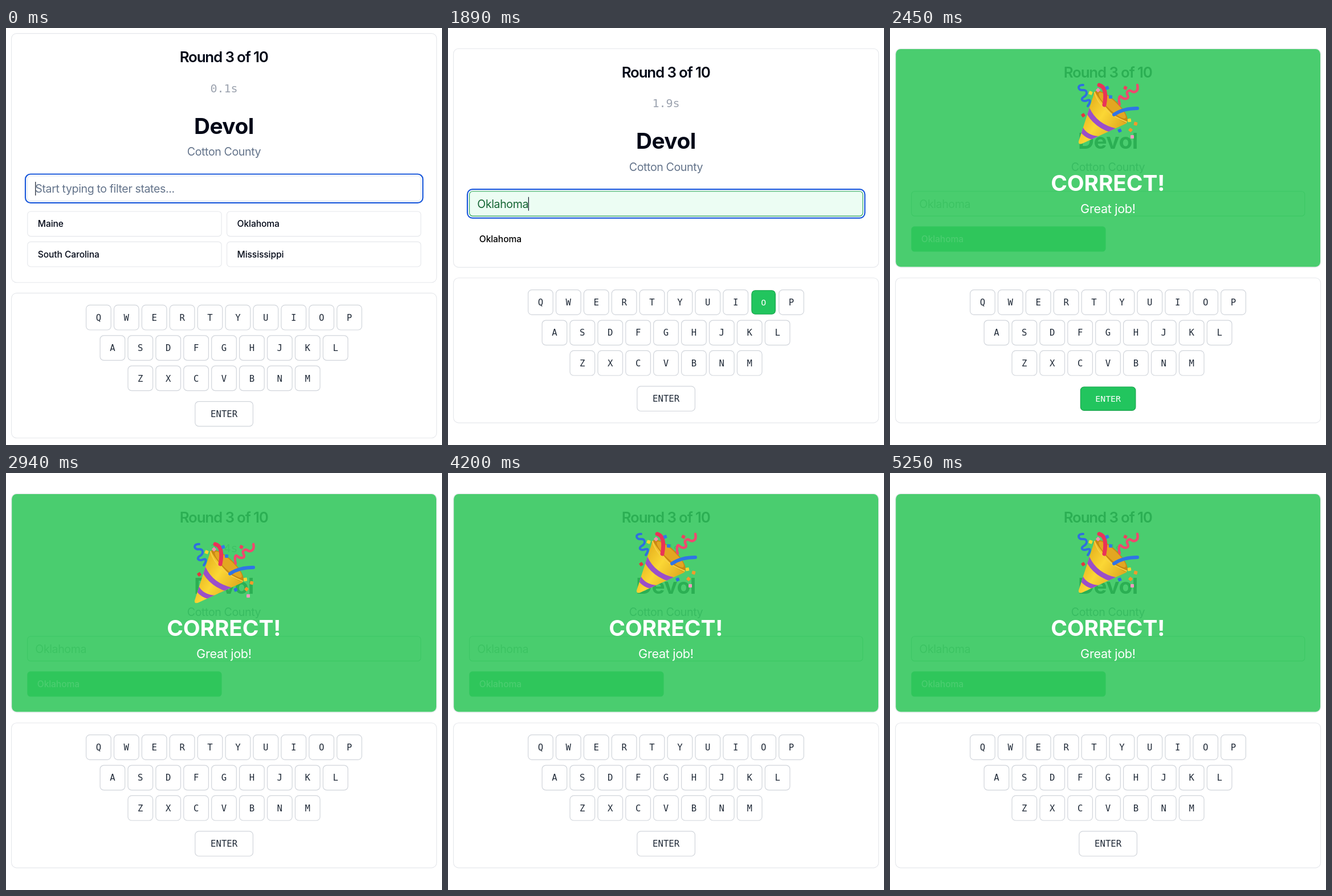
An HTML page for the animation above (5320 ms loop, 765 by 732 pixels).

```html
<!DOCTYPE html>
<html lang="en">
<head>
<meta charset="utf-8">
<title>Guess the state</title>
<style>
html, body { margin: 0; width: 100%; height: 100%; overflow: hidden; background: #fff; }
svg { display: block; font-family: Inter, sans-serif; }
.mono { font-family: "DejaVu Sans Mono", monospace; }
.mid { text-anchor: middle; }
.body { font-size: 19.6px; letter-spacing: -.4px; }
.box { fill: #fff; stroke-width: 1.1px; }
.key { transform-box: fill-box; transform-origin: center; }
.key rect { fill: #fff; stroke: #d1d5db; stroke-width: 1.2px; }
.key text { fill: #1f2937; font-size: 15.6px; }
.key.down { transform: scale(.95); }
.key.down rect { fill: #22c55e; stroke: #16a34a; }
.key.down text { fill: #fff; }
</style>
</head>
<body>
<svg id="stage" width="765" height="732" viewBox="0 0 765 732"></svg>
<script>
const LOOP = 5320, STEP = 70, TYPED = 1890, DONE = 2450, PRESS = 210, SHIFT = 26.7;

const rect = (x, y, w, h, r, attrs = '') =>
  `<rect x="${x}" y="${y}" width="${w}" height="${h}" rx="${r}" ${attrs}/>`;
const text = (x, y, str, attrs) => `<text x="${x}" y="${y}" ${attrs}>${str}</text>`;

const key = (x, y, w, label) => `<g class="key" id="key${label}">${rect(x, y, w, 43.6, 6.5)}
  ${text(x + w / 2, y + 27.4, label, 'class="mono mid"')}</g>`;
const keyRow = (letters, x, y) => [...letters].map((c, i) => key(x + i * 48.9, y, 43.6, c)).join('');

const option = (x, y, label) => rect(x, y, 340.3, 43.6, 5.5, 'class="box" stroke="#e5e7eb"') +
  text(x + 18, y + 27.3, label, 'font-size="15.6" font-weight="500" letter-spacing="-.1" fill="#020817"');

const confetti = [
  [352, 114, '#f9d62e'], [365, 109, '#f28cb1'], [381, 105, '#2f7be8'], [387, 121, '#2f7be8'],
  [413, 105, '#ef3f5f'], [339, 153, '#e5343f'], [420, 162, '#f9d62e'], [431, 168, '#f39a2b'],
  [422, 179, '#f39a2b'], [403, 180, '#2f6fe0'], [425, 191, '#f49ac0']
].map(([x, y, c], i) => rect(x - 3, y - 3, 6, 6, 1, `fill="${c}" transform="rotate(${20 + i * 25} ${x} ${y})"`)).join('');

const ribbon = (d, color, w) =>
  `<path d="${d}" fill="none" stroke="${color}" stroke-width="${w}" stroke-linecap="round" stroke-linejoin="round"/>`;

const popper = `
  <linearGradient id="gold" x1="0" y1=".3" x2="1" y2="1">
    <stop offset="0" stop-color="#e0a416"/><stop offset=".4" stop-color="#fbd735"/><stop offset="1" stop-color="#cf8d12"/>
  </linearGradient>
  <clipPath id="cone"><path d="M359 112L331 199Q330 205 337 203L416 167Q390 160 359 112Z"/></clipPath>
  <ellipse cx="387" cy="139" rx="39" ry="14" transform="rotate(43.5 387 139)" fill="#c98713"/>
  <ellipse cx="390" cy="136" rx="32" ry="8" transform="rotate(43.5 390 136)" fill="#e3a621"/>
  <g clip-path="url(#cone)">
    ${rect(328, 108, 92, 98, 0, 'fill="url(#gold)"')}
    ${ribbon('M346 142Q360 173 397 181', '#9a4fc9', 9)}
    ${ribbon('M335 176Q343 192 366 194', '#9a4fc9', 8)}
  </g>
  ${ribbon('M359 113Q368 146 415 165', '#f7cf45', 2)}
  ${ribbon('M339 100C328 99 329 110 338 109S347 117 340 121S338 130 346 127S350 133 347 137', '#2f6fe0', 4)}
  ${ribbon('M367 100Q382 104 376 135', '#ea3358', 7)}
  ${ribbon('M434 100C437 112 428 114 424 111S413 111 417 118S411 126 406 121S401 129 403 134', '#ee4a6e', 4.5)}
  ${ribbon('M393 152Q409 141 434 141', '#2f74e6', 6)}
  ${confetti}`;

stage.innerHTML = `
  <g id="card">
    <rect id="panel" x="9.6" y="9.6" width="746" rx="9" class="box" stroke="#e5e7eb"/>
    ${text(382.2, 60.2, 'Round 3 of 10', 'class="mid" font-size="25.9" font-weight="600" letter-spacing="-1.15" fill="#020817"')}
    ${text(382.5, 112.6, '', 'id="timer" class="mono mid" font-size="20" fill="#9ca3af"')}
    ${text(382.3, 185.6, 'Devol', 'class="mid" font-size="38.8" font-weight="700" letter-spacing="-.5" fill="#020817"')}
    ${text(382.5, 224, 'Cotton County', 'class="mid body" fill="#64748b"')}
    ${rect(34, 256.5, 697.4, 50.4, 9, 'id="ring" fill="none" stroke="#1d5bdb" stroke-width="2.2"')}
    <g id="field">
      ${rect(37.6, 260, 690.2, 43.4, 5.5, 'id="input" class="box"')}
      ${text(51.3, 289.3, '', 'id="value" class="body"')}
    </g>
    ${rect(0, 270, 1.2, 24, 0, 'id="caret" fill="#111827"')}
    <g id="choices">
      ${option(37.8, 322, 'Maine')}${option(387.6, 322, 'Oklahoma')}
      ${option(37.8, 375.4, 'South Carolina')}${option(387.6, 375.4, 'Mississippi')}
    </g>
    <g id="pick">
      ${rect(37.3, 321.6, 341.2, 44.2, 5.5, 'id="pickBox" fill="#22c55e"')}
      ${text(54.8, 349.3, 'Oklahoma', 'id="pickText" font-size="15.6" font-weight="500" letter-spacing="-.1"')}
    </g>
  </g>
  <g id="keys">
    ${rect(9.6, 465.4, 746, 254.4, 9, 'class="box" stroke="#e5e7eb"')}
    ${keyRow('QWERTYUIOP', 140.6, 486.4)}
    ${keyRow('ASDFGHJKL', 165.1, 539.8)}
    ${keyRow('ZXCVBNM', 214, 593.1)}
    ${key(331.8, 655.6, 101.6, 'ENTER')}
  </g>
  <g id="result">
    ${rect(10.2, 37, 744.8, 382.2, 8.5, 'fill="#31c65c" fill-opacity=".88"')}
    <g id="popper">${popper}</g>
    ${text(382.2, 285.6, 'CORRECT!', 'class="mid" font-size="38.8" font-weight="700" letter-spacing="-.1" fill="#fff"')}
    ${text(382.4, 325.2, 'Great job!', 'class="mid" font-size="21.6" letter-spacing="-.3" fill="#fff"')}
  </g>`;

const el = id => document.getElementById(id);
const show = (id, on) => el(id).setAttribute('display', on ? 'inline' : 'none');
const set = (id, attrs) => Object.entries(attrs).forEach(([k, v]) => el(id).setAttribute(k, v));

// cubic-bezier(0, 0, .2, 1)
function easeOut(x) {
  let lo = 0, hi = 1;
  for (let i = 0; i < 25; i++) {
    const s = (lo + hi) / 2;
    if (.6 * s * s + .4 * s ** 3 < x) lo = s; else hi = s;
  }
  return 3 * lo * lo - 2 * lo ** 3;
}
const bounce = p => SHIFT * (1 - easeOut(Math.abs(1 - 2 * p)));

function draw(t) {
  const typed = t >= TYPED, done = t >= DONE;
  const dy = typed ? SHIFT : 0;
  set('card', { transform: `translate(0 ${dy})` });
  set('keys', { transform: `translate(0 ${-dy})` });
  set('panel', { height: typed ? 383.8 : 437.2 });

  const ticks = Math.round(Math.min(t, DONE) / 105);
  el('timer').textContent = ((ticks + 1) / 10).toFixed(1) + 's';

  el('value').textContent = typed ? 'Oklahoma' : 'Start typing to filter states...';
  set('value', { fill: typed ? '#166534' : '#64748b' });
  set('input', { style: typed ? 'fill:#ecfdf3' : '', stroke: typed ? '#22a352' : '#e2e8f0' });
  set('field', { opacity: done ? .5 : 1 });
  show('ring', !done);
  show('caret', !done && (typed || (t + 15) % 1000 < 500));
  set('caret', { x: typed ? 51 + el('value').getComputedTextLength() : 51.2 });

  show('choices', !typed);
  show('pick', typed);
  const k = Math.max(0, Math.min(1, (t - TYPED) / 150)), v = Math.round(255 * k);
  set('pickBox', { 'fill-opacity': k });
  set('pickText', { fill: `rgb(${v},${v},${v})` });

  const down = from => t >= from && t < from + PRESS;
  el('keyO').classList.toggle('down', down(TYPED));
  el('keyENTER').classList.toggle('down', down(DONE));

  show('result', done);
  if (done) set('popper', { transform: `translate(0 ${bounce((t - 2424) / 1050 % 1)})` });
}

let last = -1;
function tick() {
  const t = Math.floor(performance.now() % LOOP / STEP) * STEP;
  if (t !== last) draw(last = t);
  requestAnimationFrame(tick);
}
tick();
</script>
</body>
</html>
```
